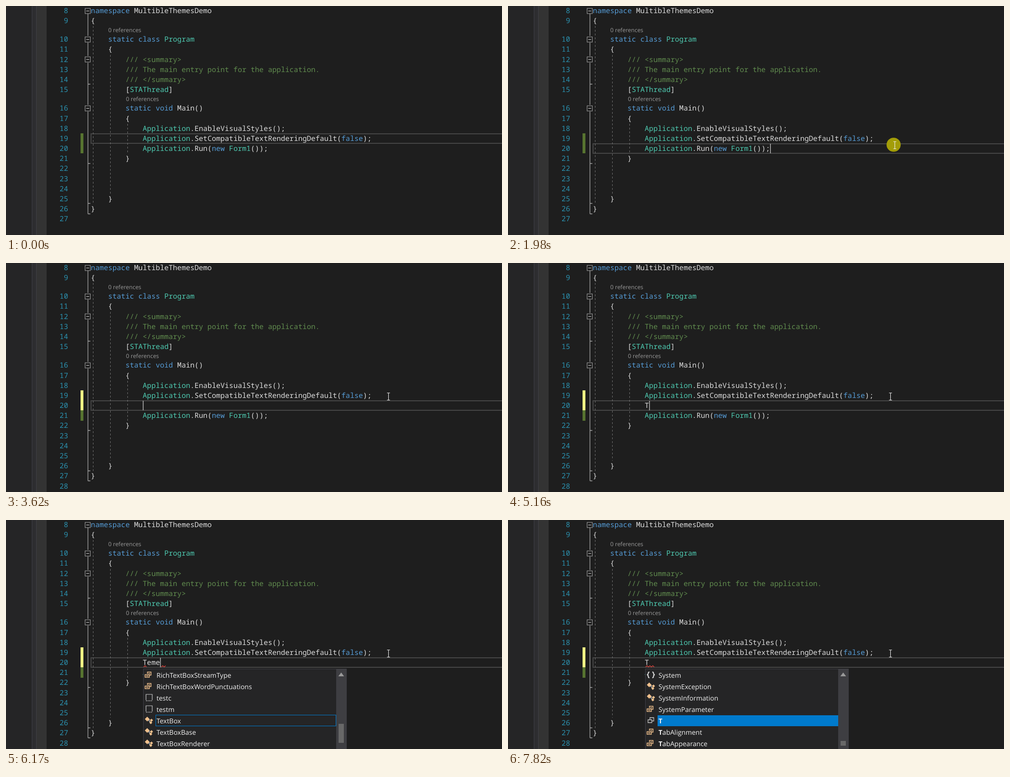
Animation of 1038x482 px, one loop 8 s. Source, as an HTML page:

```html
<!DOCTYPE html>
<html lang="en">
<head>
<meta charset="utf-8">
<title>Code editor</title>
<style>
  html, body { margin: 0; width: 100%; height: 100%; overflow: hidden; background: #1e1e1e; }
  svg { display: block; width: 1038px; height: 482px; }
  text { white-space: pre; text-rendering: geometricPrecision; }
  .code { font: 15.07px "Noto Sans Mono", "DejaVu Sans Mono", monospace; }
  .ui { font: 14px "Open Sans", "Noto Sans", sans-serif; }
  .lens { font: 12px "Open Sans", "Noto Sans", sans-serif; }
</style>
</head>
<body>
<svg id="stage" viewBox="0 0 1038 482"></svg>
<script>
const LOOP = 8000;
const CHAR = 9.04, LEFT = 177.6, ROW = 21.18;
const COLORS = { k: '#569cd6', t: '#4ec9b0', d: '#dcdcdc', c: '#608b4e' };

// Each line: number, indent, then tokens as "kind:text".
const LINES = [
  [8, 0, 'k:namespace', 'd: MultibleThemesDemo'],
  [9, 0, 'd:{'],
  [10, 4, 'k:static class ', 't:Program'],
  [11, 4, 'd:{'],
  [12, 8, 'c:/// <summary>'],
  [13, 8, 'c:/// The main entry point for the application.'],
  [14, 8, 'c:/// </summary>'],
  [15, 8, 'd:[', 't:STAThread', 'd:]'],
  [16, 8, 'k:static void ', 'd:Main()'],
  [17, 8, 'd:{'],
  [18, 12, 't:Application', 'd:.EnableVisualStyles();'],
  [19, 12, 't:Application', 'd:.SetCompatibleTextRenderingDefault(', 'k:false', 'd:);'],
  [20, 12, 't:Application', 'd:.Run(', 'k:new ', 't:Form1', 'd:());'],
  [21, 8, 'd:}'],
  [25, 4, 'd:}'],
  [26, 0, 'd:}'],
];

// Completion items: icon kind and label.
const T_ITEMS = ['n:System', 'c:SystemException', 'c:SystemInformation', 'e:SystemParameter', 'g:T',
  'e:TabAlignment', 'e:TabAppearance', 'c:TabControl'];
const TEXT_ITEMS = ['e:RichTextBoxStreamType', 'e:RichTextBoxWordPunctuations', 's:testc', 's:testm',
  'c:TextBox', 'c:TextBoxBase', 'c:TextBoxRenderer'];
const LISTS = {
  afterT: { items: T_ITEMS.slice(1), selected: 3, prefix: 't', thumb: [465, 10] },
  backToT: { items: T_ITEMS.slice(0, 7), selected: 4, prefix: 't', thumb: [465, 10] },
  match: { items: TEXT_ITEMS, selected: 4, prefix: 'te', thumb: [429, 40] },
  noMatch: { items: TEXT_ITEMS, selected: 4, prefix: '', outline: true, thumb: [429, 40] },
};

// Tracks hold their value until the next entry.
const POINTER = [[0], [190, 925.5, 478], [270, 920, 446], [340, 911, 412], [420, 905.5, 390],
  [1430, 850, 325], [1520, 825.5, 298], [1660, 815, 295], [1750, 809.5, 293],
  [2680, 804, 286], [2760, 800.5, 281]];
const CLICK = [[0], [1980, 807, 292], [2210], [2990, 798, 280], [3230]];
const ACTIVE_ROW = [[0, 19], [1980, 20], [2990, 19], [3540, 20]];
const CARET = [[0], [1980, 29], [2530], [2990, 53], [3540, 0], [4150], [4610, 0], [5160, 1], [5620],
  [6170, 4], [6720], [7100, 4], [7180], [7580, 1], [7820]];
const TYPED = [[0, ''], [5160, 'T'], [5710, 'Te'], [5940, 'Teme'], [7180, 'Tem'], [7260, 'Te'], [7580, 'T']];
const LIST = [[0], [5320, 'afterT'], [5860, 'match'], [5940, 'noMatch'], [7260, 'match'], [7580, 'backToT']];
const SQUIGGLE = [[0], [6020, 288, 294, 325, 335], [7180, 288, 325], [7260, 288, 317], [7580, 288, 308]];
const TOOLTIP = [[0, 0], [6720, .25], [6800, .5], [6870, .75], [6950, 1], [7260, 0]];

const at = (track, t) => track.filter(entry => entry[0] <= t).pop().slice(1);
const rowY = n => 9.5 + ROW * (n - 8) + (n >= 10 ? 18.1 : 0) + (n >= 16 ? 18.1 : 0);
const rowEnd = n => Math.round(rowY(n) + ROW / 2);
const colX = n => LEFT + CHAR * n;
const escapeText = s => s.replace(/</g, '&lt;').replace(/>/g, '&gt;');

const rect = (x, y, w, h, fill, extra = '') =>
  `<rect x="${x}" y="${y}" width="${w}" height="${h}" fill="${fill}" ${extra}/>`;
const path = (d, stroke, width = 1, extra = '') =>
  `<path d="${d}" fill="none" stroke="${stroke}" stroke-width="${width}" ${extra}/>`;
const label = (cls, x, y, fill, body, extra = '') =>
  `<text class="${cls}" x="${x}" y="${y}" fill="${fill}" ${extra}>${body}</text>`;
const tint = (fill, body) => `<tspan fill="${fill}">${escapeText(body)}</tspan>`;

function gutter(inserted, saved) {
  const panels = rect(0, 0, 54, 482, '#252526') + rect(54, 0, 10, 482, '#3f3f46')
    + rect(55, 0, 8, 482, '#2d2d30') + rect(64, 0, 21, 482, '#333');
  let numbers = '';
  for (let n = 8; n <= (inserted ? 28 : 27); n++)
    numbers += label('code', 130, rowY(n) + 5.2, '#2b91af', n, 'text-anchor="end"');
  const mark = (n, fill) => rect(156, rowEnd(n - 1), 6, rowEnd(n) - rowEnd(n - 1), fill);
  const marks = saved
    ? mark(19, '#577430') + mark(20, '#577430')
    : mark(19, '#eff284') + mark(20, '#eff284') + mark(21, '#577430');
  return panels + numbers + marks;
}

function outline(shift) {
  const ends = [14, 21 + shift, 25 + shift, 26 + shift].map(n => rowEnd(n) - .5);
  const ticks = ends.map(y => `M171.5 ${y}h5`).join('');
  const boxes = [8, 10, 12, 16].map(n => {
    const y = Math.round(rowY(n)) + .5;
    return rect(165.5, y - 5.5, 11, 11, '#1e1e1e', 'stroke="#a5a5a5"') + path(`M168 ${y}h6`, '#dcdcdc');
  }).join('');
  const gaps = [10, 12, 16].map(n => rect(170, rowY(n) - 7, 3, 14, '#1e1e1e')).join('');
  return path(`M171.5 16V${ends[3]}${ticks}`, '#a5a5a5', 1.3) + gaps + boxes;
}

function guides(shift) {
  return [[1, 9, 25], [5, 11, 24], [9, 17, 20]].map(([, from, to], i) =>
    path(`M${182.5 + 36 * i} ${rowEnd(from) + 1}V${rowEnd(to + shift)}`, '#717171', 1, 'stroke-dasharray="4 4"')).join('');
}

function code(shift, typed) {
  const lines = LINES.map(([n, indent, ...tokens]) => {
    const y = rowY(n >= 20 ? n + shift : n) + 5.2;
    return label('code', colX(indent), y, COLORS.d, tokens.map(s => tint(COLORS[s[0]], s.slice(2))).join(''));
  }).join('');
  return lines + label('code', colX(12), rowY(20) + 5.2, COLORS.d, typed)
    + label('lens', 214, 55, '#999', '0 references') + label('lens', 251, 200, '#999', '0 references');
}

function squiggle(spans) {
  let d = '';
  for (let i = 0; i < spans.length; i += 2) {
    d += `M${spans[i]} 309.5`;
    for (let x = spans[i] + 3, up = true; x <= spans[i + 1]; x += 3, up = !up) d += `L${x} ${up ? 306.5 : 309.5}`;
  }
  return path(d, '#e8453c', 1.1);
}

const diamond = (x, y, r) => `<path d="M${x - r} ${y}l${r} ${-r} ${r} ${r} ${-r} ${r}z" fill="#f0c08c"/>`;
const ICONS = {
  c: () => path('M-3-3L5 0M-2-2L4 5', '#dcdcdc', 1.2) + diamond(-3.5, -3, 5) + diamond(5.5, -.5, 3.2) + diamond(4, 4.5, 3.2),
  e: () => path('M-3-2V-6H4.500V.5H1M-8-.5H1V5H-8ZM-1-3H2.500M-6 2.200H-1', '#f0c08c', 1.5),
  g: () => path('M-2-2V-6H6V1H2M-6-1.500H2V4.500H-6Z', '#c8c8c8', 1.3),
  s: () => path('M-6 5V-7H7V5', '#c8c8c8', 1.2) + path('M-6 6.500H8', '#c8c8c8', 1.4, 'stroke-dasharray="2 1.500"'),
  n: () => path('M-3-6Q-5.500-6-5.500-3.500T-8 0Q-5.500 0-5.500 3T-3 6M3-6Q5.500-6 5.500-3.500T8 0Q5.500 0 5.500 3T3 6', '#dcdcdc', 2),
};

function popup({ items, selected, prefix, outline, thumb }) {
  const rows = items.map((item, i) => {
    const y = 327 + 24 * i, name = item.slice(2);
    const size = name.toLowerCase().startsWith(prefix) ? prefix.length : 0;
    const back = i !== selected ? '' : outline
      ? rect(313.5, y - 16.5, 377, 23, 'none', 'stroke="#007acc" transform="translate(0 4)"')
      : rect(313, y - 13 + 1, 378, 23, '#007acc');
    const body = size ? `<tspan font-weight="700">${name.slice(0, size)}</tspan>${name.slice(size)}` : name;
    return back + `<g transform="translate(299 ${y - 1})">${ICONS[item[0]]()}</g>` + label('ui', 315, y + 5, '#f1f1f1', body);
  }).join('');
  return rect(287.5, 313.5, 425, 200, '#252526', 'stroke="#3f3f46"') + rows
    + rect(691, 314, 21, 180, '#3e3e42') + '<path d="M695.500 329l6-8 6 8z" fill="#999"/>'
    + rect(696, thumb[0], 11, thumb[1], '#686868');
}

function tooltip(opacity) {
  return `<g opacity="${opacity}">` + rect(713.5, 410.5, 269, 49, '#424245', 'stroke="#55555a" rx="1"')
    + label('ui', 718, 431, '#f1f1f1', tint(COLORS.k, 'class') + ' System.Windows.Forms.' + tint(COLORS.t, 'TextBox'))
    + label('ui', 718, 451, '#f1f1f1', 'Represents a Windows text box control.') + '</g>';
}

const beam = (x, y) => path(`M${x - 3} ${y - 7.5}h2.500l.5.5.5-.5h2.500M${x} ${y - 7}v14M${x - 3} ${y + 7.5}h2.500l.5-.5.5.5h2.500`, '#f0f0f0', 1.1);

function scene(t) {
  const shift = t >= 3540 ? 1 : 0, settled = t >= 3620 ? 1 : 0;
  const [row] = at(ACTIVE_ROW, t), [col] = at(CARET, t), [list] = at(LIST, t), [tip] = at(TOOLTIP, t);
  const click = at(CLICK, t), pointer = at(POINTER, t), rowMid = Math.round(rowY(row));
  return gutter(shift, !settled)
    + rect(178, rowMid - 10, 900, 20, 'none', 'stroke="#464646" stroke-width="2"')
    + guides(shift) + outline(settled) + code(shift, at(TYPED, t)[0]) + squiggle(at(SQUIGGLE, t))
    + (col === undefined ? '' : rect(colX(12 + col) + .4, rowMid - 10, 1.2, 20, '#dcdcdc'))
    + (list ? popup(LISTS[list]) : '')
    + (tip ? tooltip(tip) : '')
    + (click.length ? `<circle cx="${click[0]}" cy="${click[1]}" r="14.8" fill="#a39d08"/>` : '')
    + (pointer.length ? beam(...pointer) : '');
}

const stage = document.getElementById('stage');
const start = performance.now();
let shown = '';
function frame() {
  const next = scene((performance.now() - start) % LOOP);
  if (next !== shown) stage.innerHTML = shown = next;
  requestAnimationFrame(frame);
}
frame();
</script>
</body>
</html>
```
